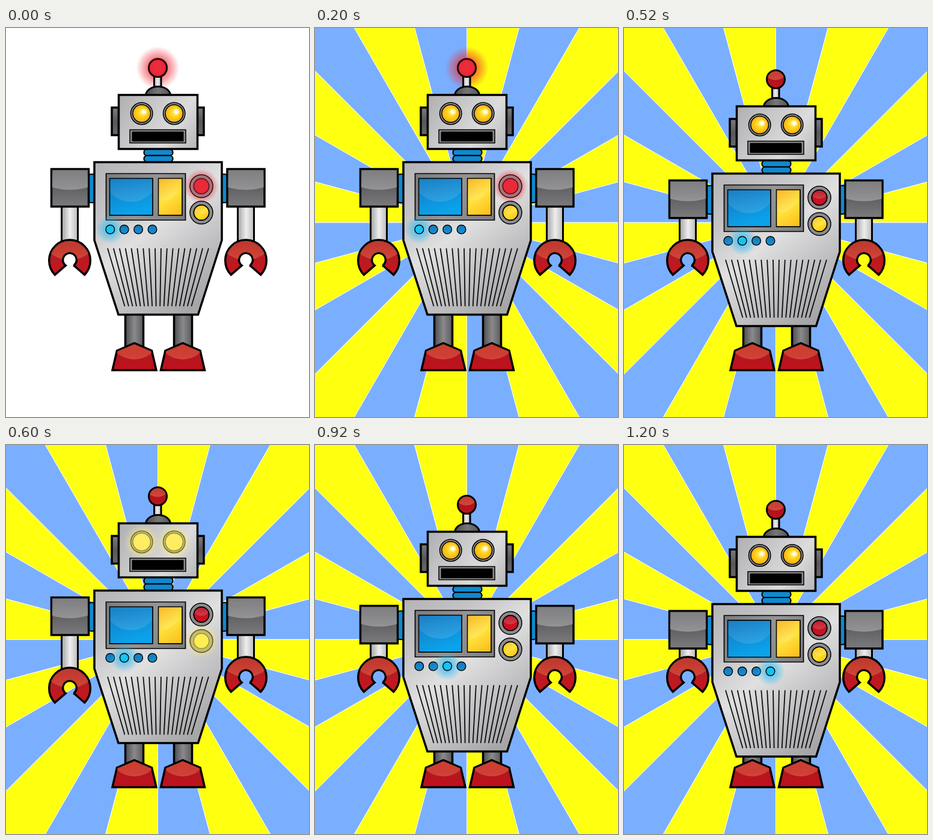
Recreate the animation shown at these times as an HTML page with a canvas. Size 504x648 px, loop 1.4 s.

```html
<!DOCTYPE html>
<html lang="en">
<head>
<meta charset="utf-8">
<title>Dancing robot</title>
<style>
html, body { margin: 0; width: 100%; height: 100%; overflow: hidden; background: #fff; }
canvas { display: block; }
</style>
</head>
<body>
<canvas id="stage" width="504" height="648"></canvas>
<script>
const c = document.getElementById('stage').getContext('2d');
const W = 504, H = 648, STEP = 200;
const YELLOW = '#ffff10', BLUE = '#7aafff';
const WHITE = '255,255,255', ORANGE = '255,140,95';

// Poses: body drop, lit lamp, claw drops, and which lights are on
const poses = [
  { y: 0.5, lamp: 0, red: true },
  { y: 0.5, lamp: 0, red: true },
  { y: 19.5, lamp: 1 },
  { y: 19.5, lamp: 1, left: 18, gold: true },
  { y: 33.5, lamp: 2 },
  { y: 33.5, lamp: 2, right: 32, red: true },
  { y: 42, lamp: 3 }
];

function grad(x0, y0, x1, y1, ...cols) {
  const g = c.createLinearGradient(x0, y0, x1, y1);
  cols.forEach((col, i) => g.addColorStop(i / (cols.length - 1), col));
  return g;
}

function shape(p, fill, lw = 3.5) {
  c.fillStyle = fill;
  c.fill(p);
  c.lineWidth = lw;
  c.strokeStyle = '#000';
  c.stroke(p);
}

function box(x, y, w, h, r = 0) {
  const p = new Path2D();
  p.roundRect(x, y, w, h, r);
  return p;
}

function disc(x, y, r) {
  const p = new Path2D();
  p.arc(x, y, r, 0, 7);
  return p;
}

function poly(...pts) {
  const p = new Path2D();
  pts.forEach(([x, y]) => p.lineTo(x, y));
  p.closePath();
  return p;
}

// Light reflection on the upper part of a shape, ending in a curve
function gloss(p, x, top, bottom, rx, alpha = 0.25, rgb = WHITE) {
  c.save();
  c.clip(p);
  c.fillStyle = grad(0, top, 0, bottom, `rgba(${rgb},.04)`, `rgba(${rgb},${alpha})`);
  c.beginPath();
  c.ellipse(x, top, rx, bottom - top, 0, 0, 7);
  c.fill();
  c.restore();
  c.lineWidth = 1.5;
  c.strokeStyle = '#000';
  c.stroke(p);
}

function glow(x, y, r, rgb, alpha = 0.8) {
  const g = c.createRadialGradient(x, y, 0, x, y, r);
  g.addColorStop(0, `rgba(${rgb},${alpha})`);
  g.addColorStop(0.45, `rgba(${rgb},${alpha * 0.75})`);
  g.addColorStop(1, `rgba(${rgb},0)`);
  c.fillStyle = g;
  c.fill(disc(x, y, r));
}

function rays(flip) {
  const cx = 252.5, cy = 324, part = Math.PI / 12;
  const edge = i => [cx + 450 * Math.sin(i * part), cy - 450 * Math.cos(i * part)];
  for (let i = 0; i < 24; i++) {
    c.fillStyle = (i % 2 === 0) !== flip ? YELLOW : BLUE;
    c.fill(poly([cx, cy], edge(i), edge(i + 1)));
  }
  c.strokeStyle = 'rgba(255,255,255,.75)';
  c.lineWidth = 1;
  for (let i = 0; i < 24; i++) c.stroke(poly([cx, cy], edge(i)));
}

function foot(x) {
  const p = poly([x - 29, 537.5], [x, 525], [x + 29, 537.5], [x + 36.5, 570], [x - 36.5, 570]);
  shape(p, grad(0, 524, 0, 570, '#c93a2c', '#b3161f', '#c2101b'));
  gloss(p, x, 520, 552, 38, 0.42, ORANGE);
}

function leg(x, top) {
  shape(box(x, top, 30, 545 - top), grad(x, 0, x + 30, 0, '#4c4c4e', '#8a8a8c', '#5a5a5c'));
}

function claw(x, dy) {
  const y = 387.3 + dy, p = new Path2D();
  p.arc(x, y, 34.3, Math.PI * 0.755, Math.PI * 2.245);
  p.lineTo(x + 6.5, y + 8);
  p.arc(x, y - 1, 11.5, Math.PI * 0.3, Math.PI * 0.7, true);
  p.closePath();
  shape(p, grad(0, y - 36, 0, y + 25, '#b8352a', '#b51c22', '#cf121e'));
  gloss(p, x, y - 36, y - 1, 44, 0.4, ORANGE);
}

function arm(x, y, drop) {
  shape(box(x - 13.5, 290 + y, 27, 80 + drop - y), grad(x - 13, 0, x + 14, 0, '#a5a5a7', '#eeeeee', '#b8b8ba'), 3);
  claw(x, drop);
}

function shoulder(x) {
  const p = box(x, 234.5, 62, 62.5);
  shape(p, grad(0, 234, 0, 298, '#737376', '#626265', '#7c7c7f'));
  gloss(p, x + 31, 228, 269, 66, 0.32);
}

function ring(x, y, r, inner, fill, lit) {
  shape(disc(x, y, r), '#8c8c8e', 1.5);
  shape(disc(x, y, inner), fill, 1.5);
  if (!lit) gloss(disc(x, y, inner), x, y - inner, y + 2, inner + 2, 0.18);
}

function antenna(on) {
  if (on) glow(252.5, 66, 36, '240,40,50');
  const ball = disc(252.5, 66, 15);
  shape(box(246.5, 78, 11.5, 24), grad(246, 0, 258, 0, '#aaa', '#eee', '#bbb'), 3);
  const dome = new Path2D();
  dome.ellipse(253, 112, 20.5, 15, 0, Math.PI, 0);
  shape(dome, grad(232, 0, 274, 0, '#4a4a4c', '#777', '#555'), 3);
  shape(ball, on ? '#df2434' : grad(0, 50, 0, 82, '#c43a2d', '#ae141e', '#c4121d'), 3);
  if (on) glow(252, 65, 18, '255,50,65', 0.55);
  else gloss(ball, 252, 49, 67, 20, 0.45, ORANGE);
}

function head(gold) {
  [176, 317.5].forEach(x => shape(box(x, 132, 11.5, 46), grad(0, 132, 0, 179, '#7c7c7f', '#58585b', '#69696c')));
  const p = box(187.5, 111, 131, 90);
  gloss(p, 245, 105, 172, 100, 0.14);
  shape(p, grad(186, 110, 320, 202, '#aeaeb0', '#c6c6c8', '#dcdcdd', '#b4b4b6'));
  for (const x of [225.7, 279.7]) {
    const iris = c.createRadialGradient(x + 2, 139, 1, x, 142, 15);
    iris.addColorStop(0, '#fff27a');
    iris.addColorStop(0.45, '#ffd51e');
    iris.addColorStop(1, '#f5ab12');
    ring(x, 142, 18.2, 14.8, gold ? '#ffe84e' : iris, true);
    if (gold) glow(x, 142, 29, '255,238,105', 0.85);
    else glow(x + 4, 139, 6, WHITE, 1);
  }
  shape(box(206, 169, 93, 22), '#8b8b8d', 1.5);
  shape(box(210, 172.5, 85, 15.5), '#000', 1);
}

function panel() {
  shape(box(166.5, 242, 132, 77.5), grad(166, 242, 299, 320, '#7c7c7f', '#949496', '#7c7c7f'), 1.7);
  const screen = box(172.5, 250, 71.5, 61.5), side = box(253.5, 250, 39.5, 61.5);
  shape(screen, grad(172, 250, 190, 312, '#0c76c0', '#108bd4', '#0aa2ea'), 1);
  gloss(screen, 208, 242, 289, 46, 0.12);
  shape(side, grad(253, 250, 293, 312, '#f7b21a', '#ffe23c', '#fbb917'), 1);
  gloss(side, 263, 242, 287, 30, 0.15);
}

function buttons(pose) {
  if (pose.red) glow(325, 263, 29, '240,45,60', 0.75);
  ring(325, 263, 19, 12.7, pose.red ? '#e32638' : grad(0, 250, 0, 276, '#b81522', '#d20e20'), pose.red);
  if (pose.red) glow(325, 263, 25, '245,45,60', 0.5);
  ring(325, 307, 19, 12.7, pose.gold ? '#ffec45' : grad(315, 295, 336, 320, '#f6ba1c', '#ffe02a', '#f6ba1c'), pose.gold);
  if (pose.gold) glow(325, 307, 28, '255,238,90', 0.8);
}

function lamps(lit) {
  for (let i = 0; i < 4; i++) {
    const x = 173.3 + i * 23.4, on = i === lit;
    if (on) glow(x, 335, 24, '20,185,245', 0.65);
    shape(disc(x, 335, 7.3), on ? '#16c3f2' : grad(0, 328, 0, 342, '#1777b5', '#168fd5'), 1.4);
  }
}

function grill() {
  c.strokeStyle = '#0c0c0c';
  c.lineWidth = 1.8;
  c.beginPath();
  for (let i = 0; i < 18; i++) {
    c.moveTo(169 + i * 9.88, 366.5);
    c.lineTo(197.5 + i * 6.52, 463);
  }
  c.stroke();
}

function torso(pose) {
  const blue = '#1089cf';
  [201.5, 212].forEach(y => shape(box(229.5, y, 48, 10.5, 5), blue, 2.2));
  [137.5, 357].forEach(x => shape(box(x, 243, 11, 47.5, 4), blue, 2.2));
  const p = poly([147, 223], [359, 223], [359, 353], [319.5, 477], [187, 477], [147, 353]);
  shape(p, grad(150, 225, 330, 450, '#b4b4b6', '#c4c4c6', '#e0e0e1', '#c2c2c4', '#a6a6a8'));
  grill();
  panel();
  buttons(pose);
  lamps(pose.lamp);
}

function draw(n) {
  const pose = poses[n];
  c.fillStyle = '#fff';
  c.fillRect(0, 0, W, H);
  if (n) rays(n % 2 === 0);
  leg(198.5, 470 + pose.y);
  leg(279.5, 470 + pose.y);
  foot(213.5);
  foot(294);
  arm(106, pose.y, pose.left || 0);
  arm(399, pose.y, pose.right || 0);
  c.save();
  c.translate(0, pose.y);
  torso(pose);
  shoulder(75.5);
  shoulder(368);
  antenna(pose.red);
  head(pose.gold);
  c.restore();
}

const start = performance.now();
let shown = -1;
function tick() {
  const n = Math.floor((performance.now() - start) / STEP) % poses.length;
  if (n !== shown) draw(shown = n);
  requestAnimationFrame(tick);
}
tick();
</script>
</body>
</html>
```
